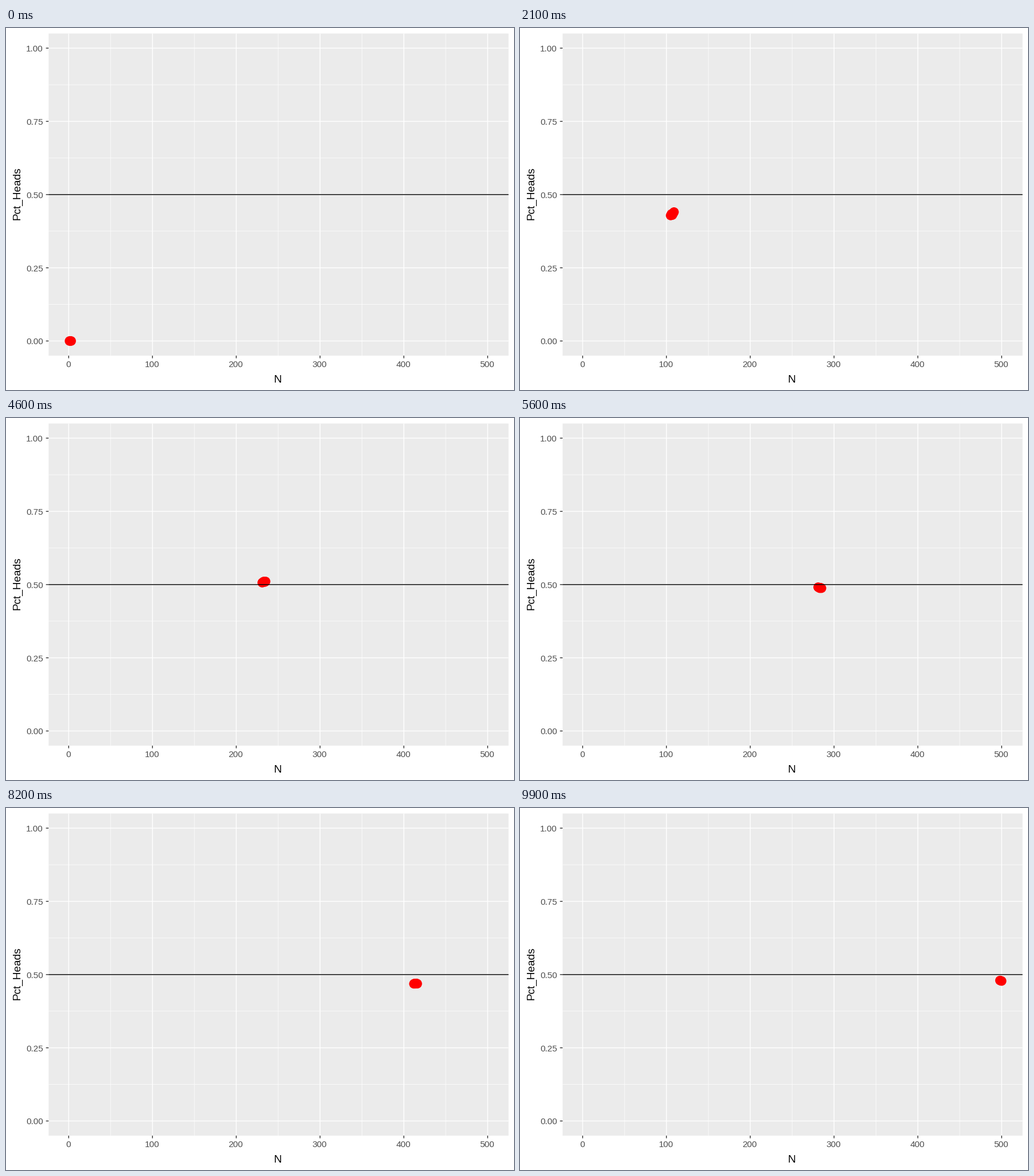
A matplotlib script that plays this animation: 885 px wide and 632 px high, repeating every 10 s.

```python
import matplotlib.pyplot as plt
import numpy as np
from matplotlib.animation import FuncAnimation
from matplotlib.patches import Circle, Rectangle

W, H, DPI = 885, 632, 100
FRAMES, TOSSES = 100, 500
PT = 72 / DPI  # points per pixel
THICK, THIN, TICK = 1.42, 0.71, 4.6
RADIUS = 8.3

plt.rcParams["font.family"] = "Liberation Sans"


def px(n):
    return 109.17 + 1.4598 * n


def py(share):
    return 546.44 - 511.25 * share


# The panel reaches 5% past the data on every side.
PAD = 0.05 * (TOSSES - 1)
LEFT, RIGHT = px(1 - PAD), px(TOSSES + PAD)
TOP, BOTTOM = py(1.05), py(-0.05)

# Head count at the turning points; flips between them are spread evenly.
TURNS = [(3, 0), (13, 7), (67, 25), (108, 47), (144, 71), (166, 79),
         (182, 89), (239, 122), (285, 139), (333, 162), (366, 172),
         (392, 188), (412, 193), (497, 239)]
toss = np.arange(1, TOSSES + 1)
heads = np.rint(np.interp(toss, *zip(*TURNS)))
points = np.column_stack([px(toss), py(heads / toss)])
shown_at = np.rint((FRAMES - 1) * (toss - 1) / (TOSSES - 1)).astype(int)

fig = plt.figure(figsize=(W / DPI, H / DPI), dpi=DPI, facecolor="white")
ax = fig.add_axes([0, 0, 1, 1])
ax.set_xlim(0, W)
ax.set_ylim(H, 0)
ax.axis("off")


def box(x0, y0, x1, y1, color, z=1):
    ax.add_patch(Rectangle((x0, y0), x1 - x0, y1 - y0, facecolor=color,
                           linewidth=0, snap=False, zorder=z))


def vline(x, y0, y1, width, color):
    box(x - width / 2, y0, x + width / 2, y1, color)


def hline(y, x0, x1, width, color, z=1):
    box(x0, y - width / 2, x1, y + width / 2, color, z)


def label(x, y, text, size, color="black", ha="center", **kw):
    ax.text(x, y, text, fontsize=size * PT, color=color, ha=ha,
            va="baseline", **kw)


box(LEFT, TOP, RIGHT, BOTTOM, "#EBEBEB", 0)

for n in range(50, TOSSES, 100):
    vline(px(n), TOP, BOTTOM, THIN, "white")
for share in np.arange(0.125, 1, 0.25):
    hline(py(share), LEFT, RIGHT, THIN, "white")

for n in range(0, TOSSES + 1, 100):
    x = px(n)
    vline(x, TOP, BOTTOM, THICK, "white")
    vline(x, BOTTOM, BOTTOM + TICK, THICK, "#333333")
    label(x - 1, 592.5, str(n), 15.3, "#4D4D4D")
for share in np.linspace(0, 1, 5):
    y = py(share)
    hline(y, LEFT, RIGHT, THICK, "white")
    hline(y, LEFT - TICK, LEFT, THICK, "#333333")
    label(65, y + 5.9, f"{share:.2f}", 15.3, "#4D4D4D", ha="right")

label(473, 619, "N", 19)
label(24, 288.5, "Pct_Heads", 19, rotation=90, rotation_mode="anchor")

most = np.bincount(shown_at).max()
dots = [ax.add_patch(Circle((0, 0), RADIUS, facecolor="red", linewidth=0,
                            zorder=2)) for _ in range(most)]
hline(py(0.5), LEFT, RIGHT, THICK, "black", 3)


def update(frame):
    now = points[shown_at == frame]
    for i, dot in enumerate(dots):
        dot.set_visible(i < len(now))
        if i < len(now):
            dot.center = now[i]
    return dots


anim = FuncAnimation(fig, update, frames=FRAMES, interval=100, repeat=True,
                     repeat_delay=0)
plt.show()
```
